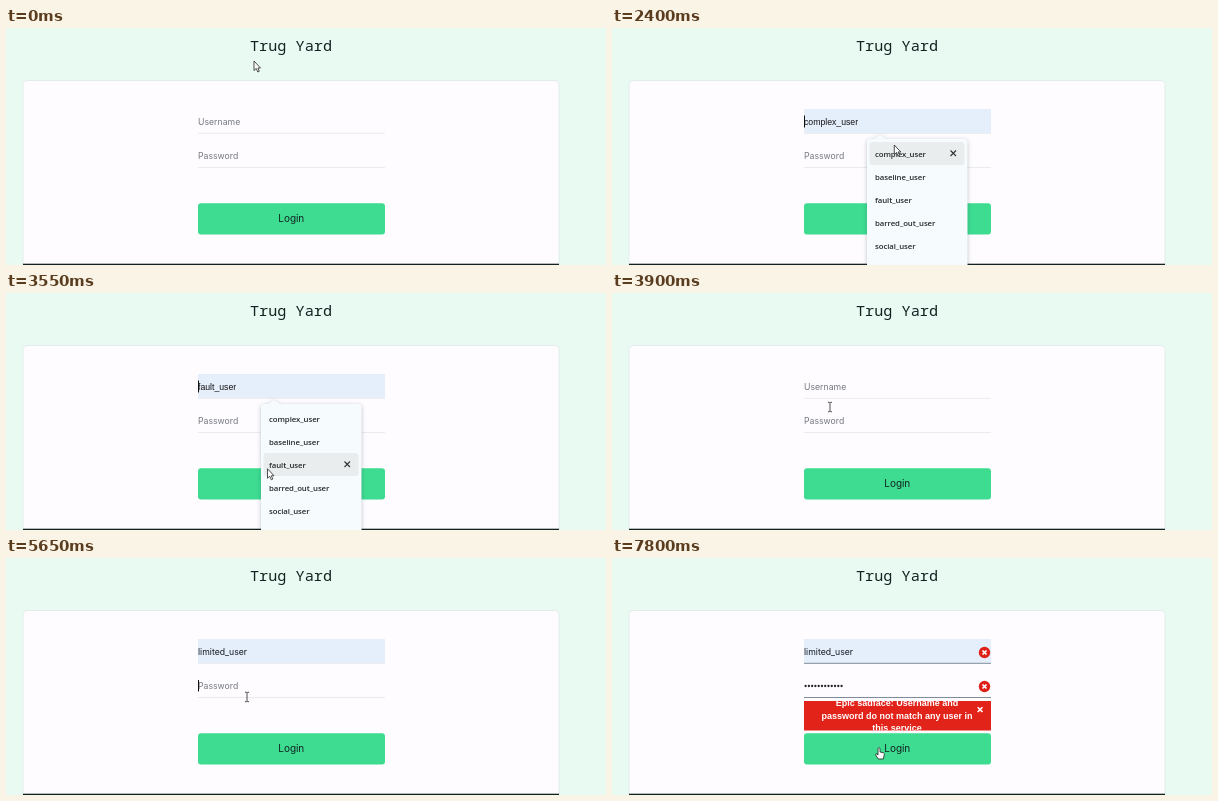
These frames come from a looping animation (600 px wide and 237 px high, 8000 ms). An HTML page:

```html
<!DOCTYPE html>
<html lang="en">
<head>
<meta charset="utf-8">
<title>Login form</title>
<style>
html, body { margin: 0; width: 100%; height: 100%; overflow: hidden; background: #e9faf3; }
svg { display: block; width: 600px; height: 237px; }
.title { font: 15.2px "Noto Sans Mono", monospace; fill: #132322; }
.text { font: 8.7px Inter, sans-serif; fill: #111820; }
.hint { fill: #757980; }
.draft { font: 8.7px "Liberation Sans", Arial, sans-serif; fill: #111; }
.login { font: 10px Inter, sans-serif; letter-spacing: -.05px; fill: #132322; text-anchor: middle; }
.menu text { font: 600 7.8px "Open Sans", "Noto Sans", sans-serif; letter-spacing: -.07px; fill: #25292c; }
.error text { font: bold 9px "Liberation Sans", Arial, sans-serif; fill: #fff; text-anchor: middle; }
.caret { stroke: #111; stroke-width: 1; }
.cursor { fill: #fff; stroke: #222; stroke-width: .8; stroke-linejoin: round; }
.panel { filter: drop-shadow(0 1px 2px rgba(40, 60, 70, .3)); }
</style>
</head>
<body>
<svg viewBox="0 0 600 237">
  <defs>
    <clipPath id="errorBox"><rect x="192" y="143" width="187" height="29.5"/></clipPath>
    <g id="badge">
      <circle r="5.7" fill="#df2018"/>
      <path d="M-2-2 2 2M2-2-2 2" stroke="#fff" stroke-width="1.7"/>
    </g>
  </defs>

  <text class="title" x="244" y="23">Trug Yard</text>
  <rect x="17" y="52.5" width="536" height="200" rx="4" fill="#fefcff" stroke="#dfeae7" stroke-width=".8"/>
  <rect x="17" y="235.7" width="536" height="2" fill="#132322"/>

  <rect id="fill" x="192" y="81" width="187" height="24.5" fill="#e5eefb"/>
  <path id="lines" d="M192 105.3h187M192 139.5h187" stroke="#ebebee"/>
  <text id="user" x="192" y="96.6"></text>
  <text id="passHint" class="text hint" x="192" y="130.7">Password</text>
  <g id="dots" fill="#222"></g>
  <path id="userCaret" class="caret" d="M192.5 87.5v12"/>
  <path id="passCaret" class="caret" d="M0 122v11.5"/>

  <g id="error" class="error">
    <use href="#badge" x="372.5" y="94.5"/>
    <use href="#badge" x="372.5" y="128.5"/>
    <g clip-path="url(#errorBox)">
      <rect x="192" y="143" width="187" height="30" fill="#e2231a"/>
      <text x="285" y="148">Epic sadface: Username and</text>
      <text x="285" y="160.5">password do not match any user in</text>
      <text x="285" y="173">this service</text>
      <path d="M365.7 149.2l4.8 4.8m0-4.8l-4.8 4.8" stroke="#fff" stroke-width="1.6"/>
    </g>
  </g>

  <rect x="192" y="175.3" width="187" height="31.2" rx="3" fill="#3ddc91"/>
  <text class="login" x="285.3" y="194.3">Login</text>

  <g id="menu" class="menu">
    <path class="panel" d="M258 111h4l6-4 6 4h78q3.500 0 3.500 3.500V260H255V114q0-3 3-3z" fill="#f6fbfd"/>
    <g id="hover">
      <rect x="257.500" y="0" width="95" height="23" rx="3" fill="#e9eded"/>
      <path d="M338.500 8.500l5.500 5.500m0-5.500l-5.500 5.500" stroke="#333" stroke-width="1.100"/>
    </g>
    <g id="rows"></g>
  </g>

  <g id="cursor" class="cursor">
    <path id="arrow" d="M0 0V9.500L2.200 7.500 3.800 11 5.300 10.300 3.800 7H6.500z"/>
    <path id="beam" d="M-2-4.700h1.500l.5.500.5-.5H2M0-4.200v8.400M-2 4.700h1.500l.5-.5.5.5H2" fill="none"/>
    <path id="hand" d="M-1 .8Q0-.6 1 .8V4.500L4.500 5.300Q5.500 5.700 5.300 7L4.300 11.500H-.8L-3.300 7.500Q-3.600 6-2.300 6.300L-1 7.500z"/>
  </g>
</svg>
<script>
const LOOP = 8000, STEP = 50;
const ROW_TOP = 114.5, ROW_H = 23;
const names = ["complex_user", "baseline_user", "fault_user", "barred_out_user", "social_user", "limited_user"];
const chosen = names[5];

// Pointer track: time, x, y
const track = [
  [0, 248, 33], [150, 258, 62], [350, 297, 170], [500, 314, 226],
  [1600, 314, 226], [1650, 309, 201], [1850, 288, 125], [2000, 281, 96],
  [2250, 281, 96], [2600, 284, 145], [3050, 291, 226],
  [3200, 291, 226], [3500, 270, 185], [3700, 236, 148], [3900, 218, 114], [4050, 226, 96],
  [4150, 226, 96], [4300, 262, 135], [4600, 288, 241], [4800, 290, 244],
  [5050, 290, 244], [5350, 268, 190], [5600, 241, 139],
  [6750, 241, 139], [7100, 267, 189.5], [LOOP, 267, 189.5]
];

const el = id => document.getElementById(id);
const show = (id, on) => el(id).setAttribute("visibility", on ? "inherit" : "hidden");
const within = (t, a, b) => t >= a && t < b;

el("rows").innerHTML = names.map((n, i) =>
  `<text x="263" y="${128.8 + i * ROW_H}">${n}</text>`).join("");
el("dots").innerHTML = Array.from({ length: 12 }, (_, i) =>
  `<circle cx="${193.6 + i * 3.27}" cy="128" r="1.15"/>`).join("");

function pointer(t) {
  const i = Math.max(1, track.findIndex(p => p[0] >= t));
  const [t0, x0, y0] = track[i - 1], [t1, x1, y1] = track[i];
  const k = (t - t0) / (t1 - t0);
  return [x0 + (x1 - x0) * k, y0 + (y1 - y0) * k];
}

function draw(t) {
  const [x, y] = pointer(t);
  const open = within(t, 2050, 3700) || within(t, 4100, 5050);
  const inMenu = open && x > 255 && x < 356 && y > ROW_TOP;
  const row = inMenu ? Math.min(5, Math.floor((y - ROW_TOP) / ROW_H)) : -1;
  const filled = t >= 5050, pasted = t >= 6550, failed = t >= 7350;

  const user = el("user");
  user.textContent = filled ? chosen : inMenu ? names[row] : "Username";
  user.setAttribute("class", filled ? "text" : inMenu ? "draft" : "text hint");
  show("fill", filled || inMenu);
  show("userCaret", open);

  show("passHint", !pasted);
  show("dots", pasted);
  show("passCaret", within(t, 5650, 6200) || within(t, 6550, 7050));
  el("passCaret").setAttribute("transform", `translate(${pasted ? 232 : 192.5})`);

  show("menu", open);
  show("hover", inMenu);
  el("hover").setAttribute("transform", `translate(0 ${ROW_TOP + 91.5 + (row - 4) * ROW_H})`);

  show("error", failed);
  el("lines").setAttribute("stroke", failed ? "#7f8c98" : "#ebebee");

  const onForm = !inMenu && x > 192 && x < 379;
  const beam = onForm && y > 81 && y < 141;
  const hand = onForm && y > 175 && y < 200;
  show("beam", beam);
  show("hand", hand);
  show("arrow", !beam && !hand);
  el("cursor").setAttribute("transform", `translate(${x} ${y})`);
}

function tick() {
  const t = performance.now() % LOOP;
  draw(Math.floor(t / STEP) * STEP);
  requestAnimationFrame(tick);
}
tick();
</script>
</body>
</html>
```
